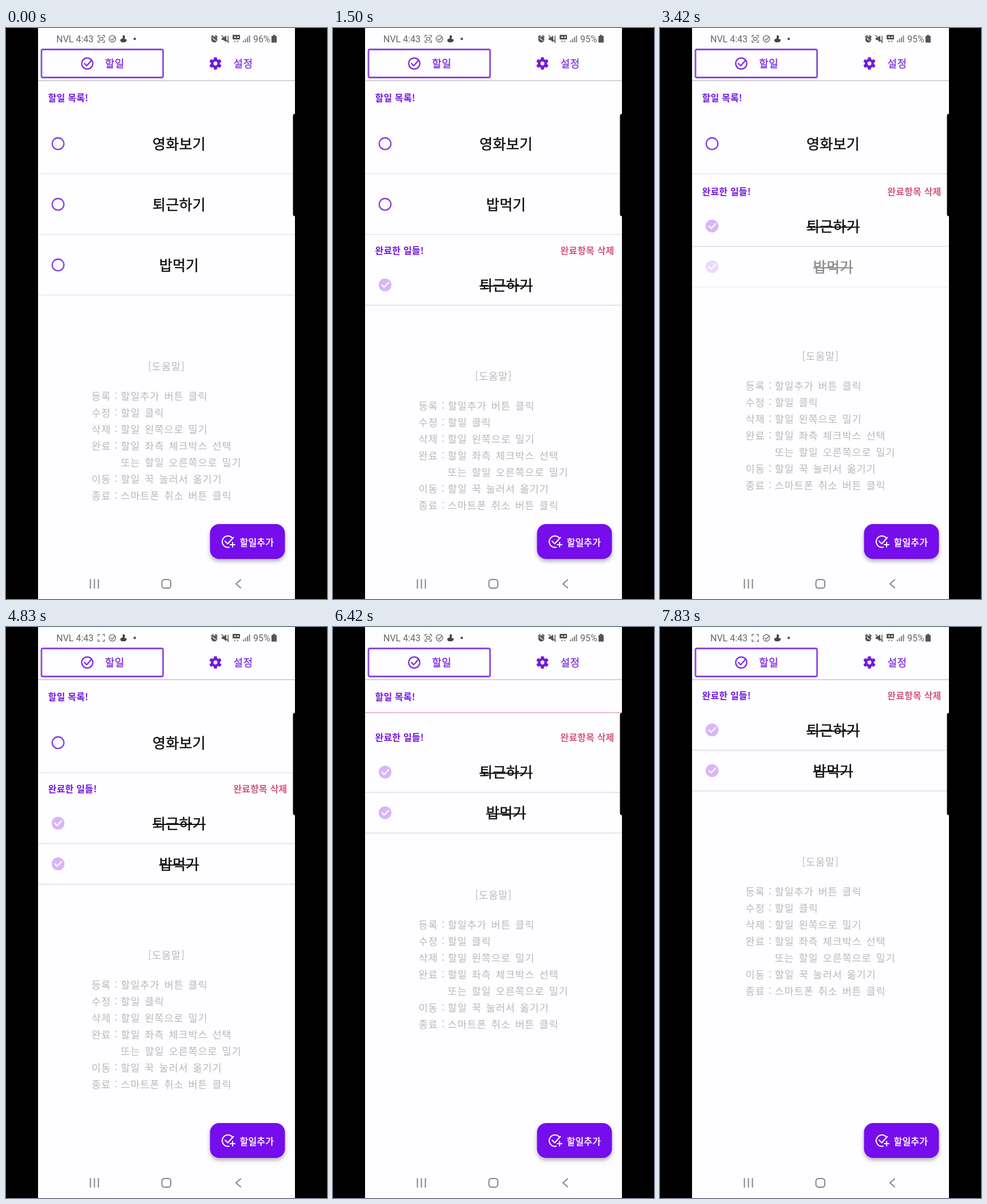
An HTML page for the animation above (8000 ms loop, 561 px wide and 998 px high).

```html
<!DOCTYPE html>
<html lang="ko">
<head>
<meta charset="utf-8">
<title>할일 목록</title>
<style>
  html, body { margin: 0; width: 100%; height: 100%; overflow: hidden; background: #000; }
  #stage { display: block; width: 100vw; height: 100vh; }
  text { font-family: "Noto Sans CJK KR", "Noto Sans CJK", sans-serif; }
  .status { font: 16px Roboto, sans-serif; fill: #666; }
  .tab { font-size: 18px; font-weight: 500; letter-spacing: .5px; fill: #7a2bdd; stroke: #7a2bdd; stroke-width: .3; }
  .head { font-size: 16px; font-weight: 700; letter-spacing: .2px; fill: #7119de; }
  .item { font-size: 25px; font-weight: 500; letter-spacing: .2px; fill: #111; stroke: #111; stroke-width: .5; text-anchor: middle; }
  .help { font-size: 17.5px; letter-spacing: .9px; word-spacing: 2.2px; fill: #b9b9bb; }
  .fab { font-size: 16px; font-weight: 500; letter-spacing: .2px; fill: #fff; stroke: #fff; stroke-width: .4; }
  .line { fill: none; stroke-linecap: round; stroke-linejoin: round; }
</style>
</head>
<body>
<svg id="stage" viewBox="0 0 561 998" xmlns="http://www.w3.org/2000/svg">
  <defs>
    <filter id="shadow" x="-20%" y="-20%" width="140%" height="160%">
      <feDropShadow dx="0" dy="4" stdDeviation="3.5" flood-color="#000" flood-opacity=".3"/>
    </filter>
  </defs>
  <rect width="561" height="998" fill="#000"/>
  <rect x="56" width="449" height="998" fill="#fefdff"/>

  <g id="help"></g>
  <g id="rows"></g>
  <g id="done"></g>
  <circle id="ripple" cx="91" cy="308" fill="#7a2bdd"/>

  <g id="bar">
    <rect x="56" width="449" height="91" fill="#fefdff"/>
    <rect x="56" y="91" width="449" height="2" fill="#d3d2d6"/>
    <text class="status" x="88" y="25">NVL 4:43</text>
    <g class="line" stroke="#777" stroke-width="1.5">
      <path d="M161 16v-3h3M169 13h3v3M172 22v3h-3M164 25h-3v-3"/>
      <circle cx="186" cy="19" r="5.7"/>
      <path d="M183 19l2.5 2.5 5-6"/>
    </g>
    <rect id="scan" x="163.5" y="16.5" width="6" height="5" rx="1.5" fill="none" stroke="#777" stroke-width="1.5"/>
    <path d="M204 13q4-1 4 3l-1 3 4 1q0 5-5 5h-3q-4-1-3-5l4-2z" fill="#444"/>
    <circle cx="225" cy="19" r="2.2" fill="#555"/>
    <g fill="#555">
      <circle cx="364" cy="20" r="5.3"/>
      <path d="M358 15l4-3 1 2-4 3zM370 15l-4-3-1 2 4 3z"/>
      <path d="M377 17h3l5-4v12l-5-4h-3z"/>
      <rect x="396" y="12" width="13" height="8" rx="1"/>
      <path d="M399 22h2v3h-2zM404 22h2v3h-2z" opacity=".6"/>
      <path d="M414 22h2v3h-2zM417.500 19h2v6h-2zM421 16h2v9h-2zM424.500 13h2v12h-2z" opacity=".75"/>
      <path d="M464 14h2.500v-2h4v2h2.500v11.500h-9z"/>
    </g>
    <path d="M377 13l12 12M388 14v11" class="line" stroke="#555" stroke-width="1.5"/>
    <path d="M362 18l2 2.500 3 1" class="line" stroke="#fff" stroke-width="1.3"/>
    <path d="M399 16h3M404 16h3" stroke="#fff" stroke-width="2"/>
    <text class="status" id="battery" x="432" y="25"></text>

    <rect x="62" y="37.500" width="212.500" height="49" rx="2.500" fill="none" stroke="#8a4ade" stroke-width="2.800"/>
    <g class="line" stroke="#7a2bdd" stroke-width="2.200">
      <circle cx="142" cy="62" r="9.700"/>
      <path d="M137 62l4 4 8-9"/>
    </g>
    <text class="tab" x="173" y="69">할일</text>
    <g id="gear" transform="translate(366 62)" fill="#7218de">
      <circle r="5.700" fill="none" stroke="#7218de" stroke-width="4.600"/>
    </g>
    <text class="tab" x="397.500" y="69">설정</text>
  </g>
  <text class="head" id="todoHead" x="73.500" y="127.500">할일 목록!</text>

  <rect x="356.500" y="867" width="131" height="61" rx="16" fill="#7410ec" filter="url(#shadow)"/>
  <g class="line" stroke="#fff" stroke-width="2">
    <path d="M396 892a10 10 0 1 0-6 15.500M383 897l4.500 4.500 10-11M392 903h8M396 899v8"/>
  </g>
  <text class="fab" x="408.500" y="905">할일추가</text>

  <g class="line" stroke="#858588" stroke-width="2">
    <path d="M147.500 964v15M154.500 964v15M161.500 964v15"/>
    <rect x="272.500" y="964" width="15.500" height="15" rx="4.500"/>
    <path d="M410 964.500l-8 7 8 7"/>
  </g>
  <path d="M505 150q-3.500 0-3.500 4v171q0 4 3.500 4z" fill="#000"/>
</svg>
<script>
const NS = "http://www.w3.org/2000/svg";
const LOOP = 8000, ROW = 106, TOP = 149.5;
const $ = id => document.getElementById(id);

function add(parent, tag, attrs = {}, text) {
  const el = document.createElementNS(NS, tag);
  set(el, attrs);
  if (text) el.textContent = text;
  parent.appendChild(el);
  return el;
}
function set(el, attrs) {
  for (const k in attrs) el.setAttribute(k, attrs[k]);
}
const show = (el, on) => el.setAttribute("display", on ? "inline" : "none");
const move = (el, x, y) => el.setAttribute("transform", `translate(${x} ${y})`);
const clamp = x => Math.max(0, Math.min(1, x));
const ramp = (t, start, dur) => clamp((t - start) / dur);
const smooth = p => p * p * (3 - 2 * p);

// Share of the way covered by a critically damped spring.
function spring(t, start) {
  const s = Math.max(0, t - start) * 0.02;
  return 1 - (1 + s) * Math.exp(-s);
}
// A spring that chases another spring.
function chase(t, start) {
  const s = Math.max(0, t - start) * 0.017;
  return 1 - (1 + s + s * s / 2 + s ** 3 / 6) * Math.exp(-s);
}

function checked(parent, x, y, color) {
  const g = add(parent, "g", { transform: `translate(${x} ${y})` });
  add(g, "circle", { r: 11.2, fill: color });
  add(g, "path", { d: "M-5.500 0l4 4 7.500-8", class: "line", stroke: "#fff", "stroke-width": 2.2 });
  return g;
}

// Active rows: a clipped box with a coloured ground under a sliding card.
function makeRow(title, color, iconX) {
  const box = add($("rows"), "svg", { x: 56, width: 449, height: ROW });
  add(box, "rect", { width: 449, height: ROW, fill: "#f4f4f5" });
  const reveal = add(box, "circle", { cx: iconX, cy: 53, r: 0, fill: color });
  const icon = add(box, "g", { transform: `translate(${iconX} 53)` });
  const card = add(box, "g");
  add(card, "rect", { width: 449, height: ROW, fill: "#fefdff" });
  add(card, "rect", { y: 104.5, width: 449, height: 2, fill: "#e6e5e9" });
  add(card, "circle", { cx: 35, cy: 52.7, r: 10.2, fill: "none", stroke: "#8540dc", "stroke-width": 2.3 });
  add(card, "text", { x: 246.5, y: 62.5, class: "item" }, title);
  return { box, reveal, icon, card };
}
const movie = makeRow("영화보기", "#d34f7c", 414);
const work = makeRow("퇴근하기", "#7410ec", 35);
const meal = makeRow("밥먹기", "#7410ec", 35);
const tick = checked(work.card, 35, 52.7, "#7d33dd");

add(movie.icon, "path", {
  d: "M-9.500-9.500h5l1.500-2h6l1.500 2h5v2.500h-19zM-8-5.500h16v14q0 2.500-2.500 2.500h-11q-2.500 0-2.500-2.500z", fill: "#fff"
});
add(movie.icon, "path", { d: "M-3.500-3v11M0-3v11M3.500-3v11", stroke: "#d34f7c", "stroke-width": 1.2 });

const badge = add(meal.icon, "circle", { fill: "#1cb7f2" });
const halo = add(meal.icon, "path", {
  d: "M15-25A29.500 29.500 0 1 1-25-14", class: "line", stroke: "#b08ac4", "stroke-width": 1.3
});
const stroke = add(meal.icon, "path", {
  d: "M-12 4l8 8 17-19", class: "line", stroke: "#fff", "stroke-width": 6, pathLength: 1
});

// Finished section, laid out from its own top edge.
function makeDone(title, y) {
  const g = add($("done"), "g");
  checked(g, 91, y, "#d8b6f7");
  add(g, "text", { x: 302.5, y: y + 9.5, class: "item" }, title);
  const half = title.length * 11.6;
  add(g, "rect", { x: 302.5 - half, y: y + 1, width: half * 2, height: 2, fill: "#111" });
  add(g, "rect", { x: 56, y: y + 34.5, width: 449, height: 2, fill: "#e6e5e9" });
  return g;
}
add($("done"), "text", { x: 73.5, y: 33.5, class: "head" }, "완료한 일들!");
add($("done"), "text", { x: 491.5, y: 33.5, class: "head", "text-anchor": "end", style: "fill:#d4587f" }, "완료항목 삭제");
makeDone("퇴근하기", 88);
const doneMeal = makeDone("밥먹기", 159);

add($("help"), "text", { x: 280.5, y: 6.5, class: "help", "text-anchor": "middle" }, "[도움말]");
[
  ["등록", "할일추가 버튼 클릭"],
  ["수정", "할일 클릭"],
  ["삭제", "할일 왼쪽으로 밀기"],
  ["완료", "할일 좌측 체크박스 선택"],
  ["", "또는 할일 오른쪽으로 밀기"],
  ["이동", "할일 꾹 눌러서 옮기기"],
  ["종료", "스마트폰 취소 버튼 클릭"]
].forEach(([key, text], i) => {
  const y = 58.5 + i * 29;
  add($("help"), "text", { x: 149.5, y, class: "help" }, key);
  if (key) add($("help"), "text", { x: 190, y, class: "help" }, ":");
  add($("help"), "text", { x: 200.5, y, class: "help" }, text);
});

for (let a = 0; a < 360; a += 60)
  add($("gear"), "rect", { x: -2.7, y: -10.8, width: 5.4, height: 5, rx: 1, transform: `rotate(${a})` });

const MOVE = 500;
const SWIPE = { drag: 2130, span: 710, reveal: 2500, shrink: 2921, end: 3350, dir: 1 };
const DELETE = { drag: 5130, span: 850, reveal: 5651, shrink: 6072, end: 6500, dir: -1 };

function swipeRow(row, s, t, y) {
  show(row.box, t < s.end);
  set(row.box, { y, height: Math.max(0.01, ROW * (1 - spring(t, s.shrink))) });
  move(row.card, s.dir * 449 * smooth(ramp(t, s.drag, s.span)), 0);
  set(row.reveal, { r: Math.max(0, t - s.reveal) * 0.924 });
}

function draw(t) {
  show($("scan"), t < 80 || (t + 670) % 1000 < 500);
  $("battery").textContent = t < 660 ? "96%" : "95%";

  const press = ramp(t, 80, 250);
  set($("ripple"), { r: 12 + 18 * smooth(press), opacity: t < 80 ? 0 : 0.14 * (1 - ramp(t, 330, 170)) });
  show(tick, t >= 330);
  show(work.box, t < MOVE);
  set(work.box, { y: TOP + ROW });

  swipeRow(movie, DELETE, t, TOP);
  swipeRow(meal, SWIPE, t, TOP + ROW * (2 - spring(t, MOVE)));

  set(badge, { r: 21 * smooth(ramp(t, 2500, 200)) });
  set(halo, { opacity: ramp(t, 2650, 80) * (1 - ramp(t, 2800, 120)) });
  const drawn = ramp(t, 2690, 260);
  show(stroke, drawn > 0);
  set(stroke, { "stroke-dasharray": `${drawn} 2` });

  const doneTop = 361 - ROW * (chase(t, SWIPE.shrink) + chase(t, DELETE.shrink)) - 57 * spring(t, DELETE.end);
  move($("done"), 0, doneTop);
  set($("done"), { opacity: ramp(t, MOVE, 200) });
  set(doneMeal, { opacity: ramp(t, SWIPE.end, 150) });
  show($("todoHead"), t < DELETE.end);

  let helpY = 591 - ROW * (spring(t, SWIPE.shrink) + spring(t, DELETE.shrink));
  if (t >= MOVE) helpY += 17.5;
  if (t >= SWIPE.end) helpY += 71;
  if (t >= DELETE.end) helpY -= 57;
  move($("help"), 0, helpY);
}

const begin = performance.now();
function tickFrame() {
  draw((performance.now() - begin) % LOOP);
  requestAnimationFrame(tickFrame);
}
draw(0);
requestAnimationFrame(tickFrame);
</script>
</body>
</html>
```
